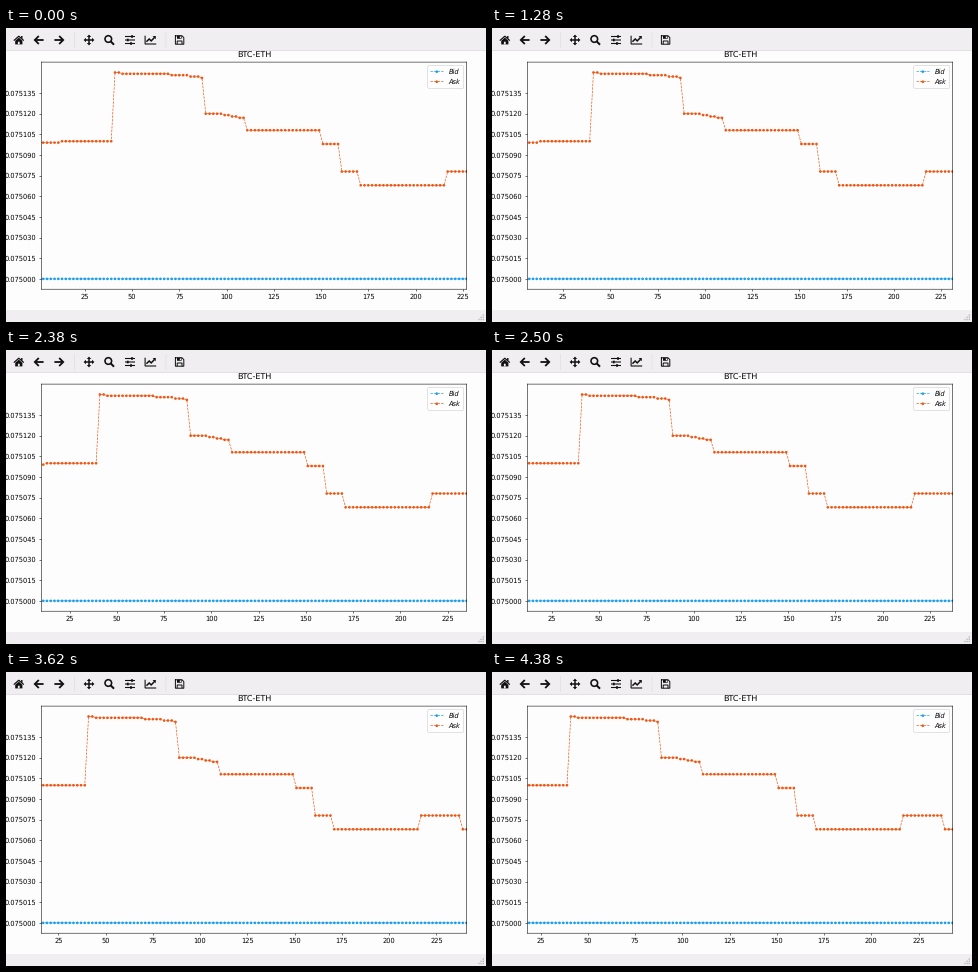
A matplotlib script for the animation above (4500 ms loop, 480x294 px).

```python
import numpy as np
import matplotlib.pyplot as plt
from matplotlib.animation import FuncAnimation
from matplotlib.patches import Circle, Polygon, Rectangle
from matplotlib.ticker import FormatStrFormatter, MultipleLocator

W, H, DPI = 480, 294, 48
LOOP_MS, STEP_MS = 4500, 20
WINDOW = 225
FIRST_X = 227
UPDATE_MS = [20, 640, 1300, 1840, 2440, 3040, 3620, 4300]

BID, ASK = "#1f9fea", "#ee5714"
PAGE, PANEL, EDGE, INK = "#fefdfe", "#f0eef0", "#e2e0e2", "#101010"

plt.rcParams["text.hinting"] = "none"
fig = plt.figure(figsize=(W / DPI, H / DPI), dpi=DPI, facecolor=PAGE)

# Window chrome, in pixels with y pointing down
ui = fig.add_axes([0, 0, 1, 1])
ui.set(xlim=(0, W), ylim=(H, 0))
ui.axis("off")


def rect(x, y, w, h, color=INK):
    ui.add_patch(Rectangle((x, y), w, h, fc=color, ec="none", snap=False))


def poly(*points, color=INK):
    ui.add_patch(Polygon(points, fc=color, ec="none", snap=False))


def stroke(*points, width=1.5, color=INK):
    """Polyline with its width given in pixels."""
    ui.plot(*zip(*points), color=color, lw=width * 72 / DPI, snap=False,
            solid_capstyle="butt", solid_joinstyle="miter")


def home(x, y):
    stroke((x - 5, y + 0.6), (x, y - 3.8), (x + 5, y + 0.6), width=1.2)
    poly((x - 3.6, y + 0.8), (x, y - 2.4), (x + 3.6, y + 0.8),
         (x + 3.6, y + 4.4), (x - 3.6, y + 4.4))
    rect(x + 2.3, y - 4, 1.4, 2.6)
    rect(x - 0.9, y + 1.7, 1.8, 2.7, PANEL)


def arrow(x, y, way):
    tip = x + 4.5 * way
    stroke((x - 4.6 * way, y), (tip - way, y), width=1.8)
    stroke((x + 0.2 * way, y - 4), (tip - 0.3 * way, y),
           (x + 0.2 * way, y + 4), width=1.8)


def move(x, y):
    stroke((x - 4, y), (x + 4, y))
    stroke((x, y - 4), (x, y + 4))
    for dx, dy in ((1, 0), (-1, 0), (0, 1), (0, -1)):
        base = np.array([x + 3 * dx, y + 3 * dy])
        side = np.array([-dy, dx]) * 2.2
        poly(base + side, base - side, (x + 5.4 * dx, y + 5.4 * dy))


def zoom(x, y):
    ui.add_patch(Circle((x - 1, y - 1), 3.3, fill=False, ec=INK,
                        lw=1.6 * 72 / DPI))
    stroke((x + 1.3, y + 1.3), (x + 4.7, y + 4.7), width=2)


def sliders(x, y):
    for dy, knob in ((-3.5, 2), (0, -2.2), (3.5, 1)):
        stroke((x - 5, y + dy), (x + 5, y + dy), width=1.1)
        rect(x + knob - 0.9, y + dy - 1.3, 1.8, 2.6)


def chart(x, y):
    stroke((x - 5.3, y - 4.3), (x - 5.3, y + 4), (x + 5.8, y + 4), width=1.1)
    stroke((x - 4, y + 1.7), (x - 1.2, y - 1), (x + 0.8, y + 0.9),
           (x + 4.2, y - 2.6), width=1.5)
    poly((x + 2.2, y - 4), (x + 5.4, y - 4), (x + 5.4, y - 0.8))


def save(x, y):
    stroke((x - 4.2, y - 4.2), (x + 2.4, y - 4.2), (x + 4.2, y - 2.4),
           (x + 4.2, y + 4.2), (x - 4.2, y + 4.2), (x - 4.2, y - 4.7), width=1)
    rect(x - 2.6, y - 4.4, 4.6, 3.2)
    rect(x + 0.2, y - 3.8, 1.2, 2, PANEL)
    stroke((x - 2.4, y + 4.2), (x - 2.4, y + 1), (x + 2.4, y + 1),
           (x + 2.4, y + 4.2), width=1)


rect(0, 0, W, 22, PANEL)
rect(0, 22, W, 1, EDGE)
rect(0, 282, W, H - 282, PANEL)
for x in (68, 159.5):
    rect(x, 4, 0.8, 16, EDGE)
home(12.8, 12)
arrow(33, 12, -1)
arrow(53, 12, 1)
move(83, 12)
zoom(103.3, 12)
sliders(124, 12)
chart(144.4, 12)
save(173.6, 12)
for row in range(3):
    for col in range(row + 1):
        rect(476.6 - 2.2 * col, 286.4 + 2.2 * row, 1.4, 1.4, "#bcbabc")

# Price chart: the ask holds each level up to the given x
ASK_STEPS = [(11, 99), (39, 100), (43, 149.95), (69, 149), (79, 148),
             (85, 147), (87, 146), (97, 120), (101, 119), (105, 118),
             (109, 117), (149, 108), (159, 98), (169, 78), (215, 68),
             (237, 78), (243, 68)]
ends, levels = np.array(ASK_STEPS).T
xs = np.arange(1, 244, 2)
ask = 0.075 + levels[np.searchsorted(ends, xs)] * 1e-6
bid = np.full(len(xs), 0.075)

LEFT, RIGHT, TOP, BOTTOM = 35.3, 460.6, 34.1, 261.2
ax = fig.add_axes([LEFT / W, 1 - BOTTOM / H,
                   (RIGHT - LEFT) / W, (BOTTOM - TOP) / H], facecolor=PAGE)
ax.set_title("BTC-ETH")
ax.set_ylim(0.0749925, 0.0751575)
ax.set_yticks(0.075 + np.arange(0, 136, 15) * 1e-6)
ax.yaxis.set_major_formatter(FormatStrFormatter("%.6f"))
ax.xaxis.set_major_locator(MultipleLocator(25))
for spine in ax.spines.values():
    spine.set_snap(False)


def series(prices, color):
    line, = ax.plot(xs, prices, "--", color=color, lw=1, snap=False)
    # One colour per dot keeps the dots at subpixel positions
    dots = ax.scatter(xs, prices, s=16, c=[color] * len(xs), linewidths=0,
                      zorder=2)
    return line, dots


handles = [series(bid, BID), series(ask, ASK)]
ax.legend(handles, ["Bid", "Ask"], loc="upper right",
          prop={"style": "italic", "size": 10})


def update(frame):
    updates = np.searchsorted(UPDATE_MS, frame * STEP_MS, side="right")
    last = FIRST_X + 2 * updates
    ax.set_xlim(last - WINDOW, last)
    return ax,


anim = FuncAnimation(fig, update, frames=LOOP_MS // STEP_MS,
                     interval=STEP_MS, repeat=True, repeat_delay=0)
plt.show()
```
